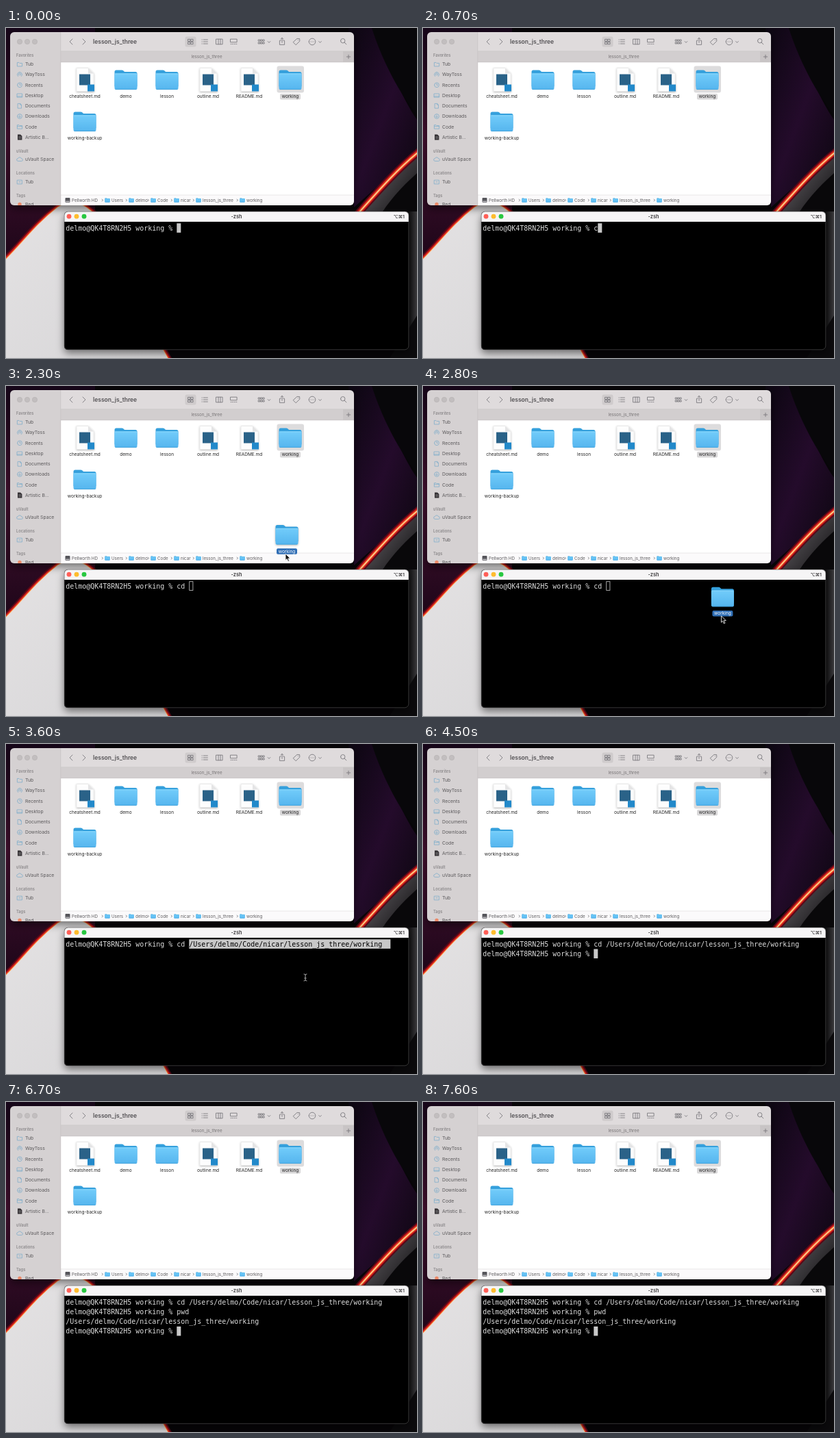
Write an HTML page that moves like this. It is 600 px wide and 482 px high and loops after 7700 ms.

```html
<!DOCTYPE html>
<html lang="en">
<head>
<meta charset="utf-8">
<title>Drag a folder into the terminal</title>
<style>
html, body { margin: 0; width: 100%; height: 100%; overflow: hidden; background: #070508; }
svg { display: block; }
text { font-family: Inter, "Open Sans", "DejaVu Sans", sans-serif; white-space: pre; }
.mono { font: 9.97px "DejaVu Sans Mono", "Liberation Mono", monospace; fill: #dcdcdc; }
.line { fill: none; stroke: #77757a; stroke-width: .85; stroke-linecap: round; stroke-linejoin: round; }
.side { stroke: #80aecb; stroke-width: .8; }
.drag { animation: drag 7.7s linear infinite; }
@keyframes drag {
  0%, 19.48% { transform: translate(20px, 42px); animation-timing-function: ease-out; }
  22.08%, 23.38% { transform: translate(0, 0); animation-timing-function: ease-in-out; }
  29.87% { transform: translate(-5px, 141px); animation-timing-function: ease-in-out; }
  37.66%, 100% { transform: translate(24px, 237px); }
}
</style>
</head>
<body>
<svg id="stage" width="600" height="482"></svg>
<script>
const LOOP = 7700;
const USER = "delmo";
const PATH = `/Users/${USER}/Code/nicar/lesson_js_three/working`;
const PROMPT = USER + "@QK4T8RN2H5 working % ";
const CELL = 6, ROW = 14.2, LEFT = 87.3, TOP = 285.3;

let css = "", spans = 0;

// Shows the markup only between two times of the loop.
function span(from, to, markup) {
  const name = "s" + spans++, pct = ms => (ms / LOOP * 100).toFixed(3) + "%";
  css += `@keyframes ${name}{0%{visibility:hidden}${pct(from)}{visibility:visible}${pct(to)}{visibility:hidden}}
.${name}{animation:${name} ${LOOP}ms step-end infinite}`;
  return `<g class="${name}">${markup}</g>`;
}

const rect = (x, y, w, h, fill, r = 0, more = "") =>
  `<rect x="${x}" y="${y}" width="${w}" height="${h}" rx="${r}" fill="${fill}" ${more}/>`;
const dot = (x, y, r, fill, more = "") => `<circle cx="${x}" cy="${y}" r="${r}" fill="${fill}" ${more}/>`;
const text = (x, y, size, fill, str, more = "") =>
  `<text x="${x}" y="${y}" font-size="${size}" fill="${fill}" ${more}>${str}</text>`;
const mid = 'text-anchor="middle"';
const bold = 'font-weight="600"';
const line = (x, y, d, cls = "") => `<path class="line ${cls}" transform="translate(${x} ${y})" d="${d}"/>`;

const defs = `<defs>
  <linearGradient id="blue" x2="0" y2="1"><stop stop-color="#72ccfa"/><stop offset="1" stop-color="#55b5ee"/></linearGradient>
  <linearGradient id="plum" x2="0" y2="1"><stop stop-color="#160619"/><stop offset=".45" stop-color="#43102f"/><stop offset="1" stop-color="#1c0618"/></linearGradient>
  <linearGradient id="violet" x2="1" y2="1"><stop stop-color="#0b0610"/><stop offset=".5" stop-color="#240b2b"/><stop offset="1" stop-color="#0a060d"/></linearGradient>
  <linearGradient id="pale" x2="1" y2="1"><stop stop-color="#e4e2e3"/><stop offset="1" stop-color="#d6d5d7"/></linearGradient>
  <linearGradient id="steel" x1="0" y1="0" x2="1" y2=".8"><stop stop-color="#bab7ba"/><stop offset=".45" stop-color="#4b484c"/><stop offset="1" stop-color="#0c0b0d"/></linearGradient>
  <linearGradient id="ash" x2="1"><stop stop-color="#0a0a0b"/><stop offset="1" stop-color="#3a393c"/></linearGradient>
  <filter id="shade" x="-20%" y="-20%" width="140%" height="150%"><feDropShadow dx="0" dy="5" stdDeviation="6" flood-opacity=".5"/></filter>
  <filter id="lift" x="-30%" y="-30%" width="160%" height="170%"><feDropShadow dx="0" dy="1" stdDeviation="1.5" flood-opacity=".3"/></filter>
  <clipPath id="finder"><rect x="6" y="6" width="502" height="253" rx="6"/></clipPath>
  <clipPath id="term"><rect x="85" y="268" width="503" height="202" rx="5.5"/></clipPath>
  <g id="folder">
    <path d="M-16.5-11.5q0-2.5 2.5-2.5h8q1.5 0 2.5 1l1.6 1.6h15.9q2.5 0 2.5 2.5V10h-33z" fill="#36a0dc"/>
    <rect x="-16.5" y="-9.2" width="33" height="23.7" rx="2" fill="url(#blue)"/>
    <path d="M-16-8.6h32" stroke="#92dafc" stroke-width=".8"/>
    <path d="M-15.4 14.1h30.8" stroke="#3f9fd8" stroke-width=".8"/>
  </g>
  <g id="doc" filter="url(#lift)">
    <path d="M-12-17H5L13-9V17h-25z" fill="#fdfdfd" stroke="#dcdcdc" stroke-width=".5"/>
    <path d="M5-17v8h8z" fill="#e4e4e5"/>
    <rect x="-8" y="-8" width="16" height="16" fill="#2c6288"/>
    <rect x="4" y="7" width="10" height="10" fill="#2489ca"/>
  </g>
  <path id="arrow" d="M0 0v9.5l2.2-2 1.6 3.7 1.7-.7-1.6-3.6h3z" fill="#111" stroke="#fff" stroke-width=".8"/>
</defs>`;

// Layered strokes make the glowing rim of the wallpaper shapes.
const rim = d => [["#5a0716", 11], ["#c5151b", 7], ["#f2662a", 3.6], ["#ffd7a0", 1.4]]
  .map(([c, w]) => `<path d="${d}" fill="none" stroke="${c}" stroke-width="${w}"/>`).join("");

function wallpaper() {
  const lobe = "M-8 346C22 318 40 290 76 262C120 235 160 300 190 400L240 490";
  const blade = "M606 178C574 203 545 236 506 280";
  return rect(0, 0, 600, 482, "#070508")
    + rect(0, 0, 130, 345, "url(#plum)")
    + `<path d="M500 0h42C560 60 580 105 600 134V180L508 262z" fill="url(#violet)"/>
       <path d="M534 0h66v128C574 94 550 50 534 0z" fill="#08070a"/>`
    + `<path d="M606 180C574 205 545 238 506 282H606z" fill="url(#steel)"/>`
    + rim(blade)
    + `<path d="M600 212C580 230 564 247 550 268h50z" fill="#09080a"/>`
    + rect(586, 268, 14, 214, "url(#ash)")
    + `<path d="M600 420L560 482H600z" fill="#0b0a0c"/>`
    + rim(lobe)
    + `<path d="${lobe}H-8z" fill="url(#pale)"/>`;
}

function sidebar() {
  const head = (y, str) => text(15, y + 2, 5.7, "#8b888a", str, bold);
  const disk = "M-3.4-2.8h6.8v5.6h-6.8zM-1-.2h2";
  const puff = "M-2.5 2.4a1.9 1.9 0 0 1 0-3.8 2.7 2.7 0 0 1 5.1.3 1.7 1.7 0 0 1 .3 3.5z";
  const rows = [
    [53, "Tub", "M-3.6 2.6v-5.2h2.6l1 1h3.6v4.2z"],
    [68, "WayToss", "M-2.5 2.5a3.5 3.5 0 1 1 5 0M-1.2 1a1.7 1.7 0 1 1 2.4 0M0 0v.2"],
    [83.3, "Recents", "M-3.4 0a3.4 3.4 0 1 0 6.8 0a3.4 3.4 0 1 0-6.8 0M0-2V0h1.6"],
    [98.6, "Desktop", "M-3.6-2.6h7.2v5.2h-7.2zM-3.6 1.2h7.2"],
    [113.8, "Documents", "M-2.5-3.4h3.2l1.8 1.8v5h-5zM.7-3.4v1.8h1.8"],
    [129, "Downloads", "M-3.4 0a3.4 3.4 0 1 0 6.8 0a3.4 3.4 0 1 0-6.8 0M0-1.8v3.4M-1.3.4 0 1.7 1.3.4"],
    [144.2, "Code", "M-3.6 2.6v-5.2h2.6l1 1h3.6v4.2zM-3.6-.5h7.2"],
    [159.4, "Artistic B...", ""],
    [192, "uVault Space", puff],
    [225, "Tub", disk]
  ];
  return rect(6, 6, 74, 253, "#d5d1d2") + rect(79.5, 6, .7, 253, "#c5c1c2")
    + [20, 31, 42].map(x => dot(x, 20, 3.7, "#c2bebf", 'stroke="#b2aeaf" stroke-width=".5"')).join("")
    + head(40, "Favorites") + head(179.5, "uVault") + head(212, "Locations") + head(245, "Tags")
    + rows.map(([y, str, d]) => text(28, y + 2.4, 6.8, "#5a585a", str) + line(20, y, d, "side")).join("")
    + `<path d="M17 155.4h4l2.4 2.4v5.8H17z" fill="#363336"/><path d="M18.2 159h4M18.2 161h4" stroke="#aaa" stroke-width=".6"/>`
    + dot(20, 257.5, 2.7, "#ec8a69") + text(28, 260, 6.8, "#5a585a", "Red");
}

function toolbar() {
  const square = (x, y, s) => `M${x} ${y}h${s}v${s}h${-s}z`;
  const four = [[-3.6, -3.6], [.6, -3.6], [-3.6, .6], [.6, .6]].map(([x, y]) => square(x, y, 3)).join("");
  const six = [-4.4, -1.2, 2].map(x => square(x, -3, 2.1) + square(x, .9, 2.1)).join("");
  const down = "M-1.8-.8 0 1 1.8-.8";
  const icons = [
    [95, 20, "M2-4-2 0 2 4"], [114, 20, "M-2-4 2 0-2 4"],
    [269.5, 20, four],
    [290, 20, "M-4-3h.4M-4 0h.4M-4 3h.4M-1.8-3H4.4M-1.8 0H4.4M-1.8 3H4.4"],
    [311.5, 20, "M-4.6-3.8h9.2v7.6h-9.2zM-1.5-3.8v7.6M1.5-3.8v7.6"],
    [332.5, 20, "M-4.6-3.8h9.2v4.6h-9.2zM-4.4 3.4h1M-1.8 3.4h1M.8 3.4h1M3.4 3.4h1"],
    [373, 20, six], [384, 20.4, down],
    [403, 20, "M-1.8-1.6h-1.8v6h7.2v-6H1.8M0 1.4v-7M-2-3.6 0-5.6 2-3.6"],
    [424, 20, "M-4.5.4 1-4.6l3.6.2.2 3.6L-.6 4.5zM2.5-2.4v.1"],
    [447, 20, "M-4.8 0a4.8 4.8 0 1 0 9.6 0a4.8 4.8 0 1 0-9.6 0M-2.2 0h.1M0 0h.1M2.2 0h.1"],
    [458.5, 20.4, down],
    [492.5, 19.5, "M-4-.8a3.2 3.2 0 1 0 6.4 0a3.2 3.2 0 1 0-6.4 0M1.6 1.6 4.4 4.4"]
  ];
  return rect(80, 6, 428, 28, "#dfdbdc") + rect(80, 34, 428, 16, "#d2cecf")
    + rect(80, 33.6, 428, .6, "#c4c0c1") + rect(80, 49.6, 428, .6, "#c0bcbd")
    + rect(261.5, 12.5, 16, 15, "#cfcbcc", 2.5)
    + rect(492, 34, 16, 16, "#c8c4c5") + line(500, 42, "M-2.7 0h5.4M0-2.7v5.4")
    + text(127, 23, 8.5, "#535154", "lesson_js_three", bold)
    + text(293, 44.2, 6.2, "#777476", "lesson_js_three", mid)
    + icons.map(i => line(...i)).join("");
}

const use = (id, x, y, scale = 1) => `<use href="#${id}" transform="translate(${x} ${y}) scale(${scale})"/>`;

function files() {
  const items = ["cheatsheet.md", "demo", "lesson", "outline.md", "README.md", "working", "working-backup"];
  const selected = rect(395.5, 55.5, 39.5, 39, "#dddcdd", 3) + rect(400, 96, 30, 8.4, "#d8d7d8", 1.6);
  return rect(80, 50, 428, 195, "#fff") + selected + items.map((str, i) => {
    const x = 115 + i % 6 * 60, y = 75.5 + (i > 5) * 61;
    return use(str.endsWith(".md") ? "doc" : "folder", x, y) + text(x, y + 26.9, 6.5, "#242424", str, mid);
  }).join("");
}

function crumbs() {
  const parts = [[90, "Pellworth HD"], [148, "Users"], [183, USER], [215, "Code"], [249, "nicar"],
    [281, "lesson_js_three"], [345, "working"]];
  return rect(80, 244, 428, 15, "#fbfafb") + rect(80, 243.7, 428, .6, "#d9d7d8")
    + parts.map(([x, str], i) => (i ? use("folder", x, 251.5, .22) + line(x - 7.2, 251.5, "M-.7-1.4.7 0-.7 1.4")
      : rect(86.5, 248, 7, 6.8, "#55545a", 1) + rect(87.2, 252.6, 5.6, 1.4, "#bdbcc0"))
      + text(x + 6, 253.7, 6.15, "#5c5a5d", str)).join("");
}

const term = (col, row, str, fill = "#dcdcdc") =>
  `<text class="mono" x="${LEFT + col * CELL}" y="${TOP + 10.2 + row * ROW}" style="fill:${fill}">${str}</text>`;
const block = (col, row, cells = 1) =>
  rect(LEFT + col * CELL, TOP + row * ROW, cells * CELL, 13.6, "#c8c8c8");

function terminal() {
  const hollow = rect(LEFT + 30 * CELL + .4, TOP + .4, CELL - .8, 12.8, "none", 0, 'stroke="#c8c8c8" stroke-width=".8"');
  const carets = [[0, 27, 0], [700, 28, 0], [800, 29, 0], [900, 30, 0], [1700],
    [4100, 27, 1], [4900, 28, 1], [5000, 29, 1], [5100, 30, 1], [5400, 27, 3], [LOOP]];
  const caret = carets.slice(0, -1).map(([from, col, row], i) =>
    col ? span(from, carets[i + 1][0], block(col, row)) : "").join("");
  const keys = [[700, 27, 0, "c"], [800, 28, 0, "d"], [4100, 0, 1, PROMPT], [4900, 27, 1, "p"], [5000, 28, 1, "w"],
    [5100, 29, 1, "d"], [5400, 0, 2, PATH], [5400, 0, 3, PROMPT], [4100, 30, 0, PATH]];
  const lights = ["#ff5f57", "#febc2e", "#28c840"];
  return rect(85, 268, 503, 202, "#000") + rect(85, 268, 503, 15, "#f6f5f6")
    + lights.map((c, i) => dot(92 + i * 11, 275.2, 3.4, c)).join("")
    + text(336.5, 277.8, 7.4, "#3c3b3d", "-zsh", mid + " " + bold)
    + text(582, 277.6, 6.8, "#3c3b3d", "⌥⌘1", 'text-anchor="end" ' + bold)
    + term(0, 0, PROMPT)
    + keys.map(([from, ...key]) => span(from, LOOP, term(...key))).join("")
    + caret + span(1700, 3000, hollow)
    + span(3000, 4100, block(30, 0, 49) + term(30, 0, PATH, "#000"));
}

function pointer() {
  const ghost = `<g filter="url(#lift)">${use("folder", 415, 76)}</g>`
    + rect(400, 96.2, 30, 8.6, "#2f6eb5", 2) + text(415, 102.6, 6.5, "#fff", "working", mid);
  const beam = "M-2-5q2 0 2 1.4V3.6Q0 5-2 5M2-5q-2 0-2 1.4M2 5Q0 5 0 3.6M-1.2 1h2.4";
  return `<g class="drag">${span(1800, 3000, ghost)}${span(1500, 3000, use("arrow", 413, 104))}</g>`
    + span(3000, 4100, line(437, 341, beam).replace("<path", '<path style="stroke:#c4c4c4"'));
}

const stage = document.getElementById("stage");
stage.innerHTML = defs + wallpaper()
  + `<g filter="url(#shade)"><g clip-path="url(#finder)">${files()}${toolbar()}${crumbs()}${sidebar()}</g></g>`
  + `<g filter="url(#shade)">${rect(85, 268, 503, 202, "#000", 5.5)}</g>`
  + `<g clip-path="url(#term)">${terminal()}</g>`
  + rect(85.2, 268.2, 502.6, 201.6, "none", 5.5, 'stroke="#5b5a5c" stroke-width=".6"')
  + pointer();

const sheet = document.createElement("style");
sheet.textContent = css;
document.head.append(sheet);
</script>
</body>
</html>
```
